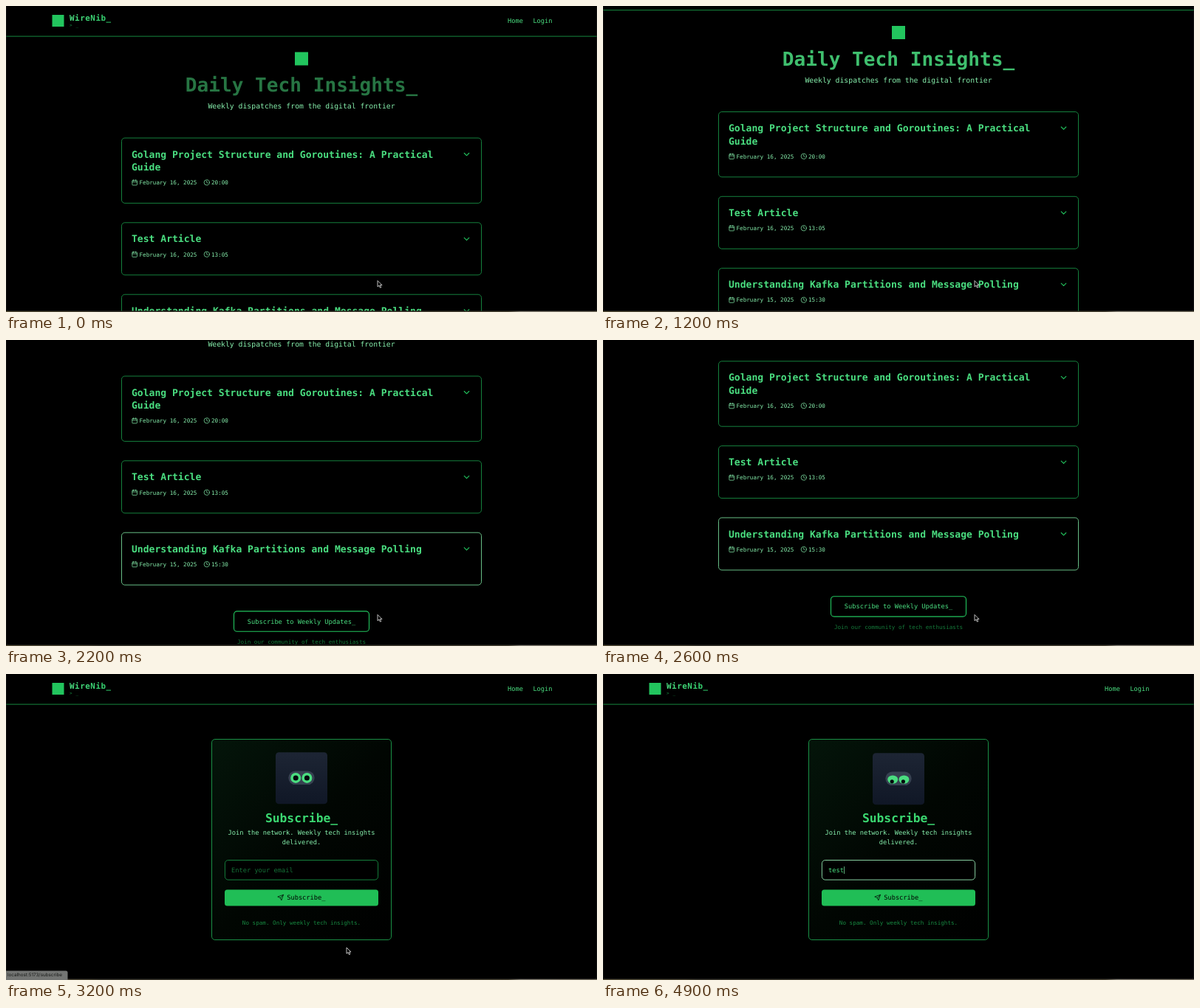
An HTML page for the animation above (5 s loop, 800x415 px).

```html
<!DOCTYPE html>
<html lang="en">
<head>
<meta charset="utf-8">
<title>Tech dispatches</title>
<style>
html, body { margin: 0; width: 100%; height: 100%; overflow: hidden; background: #000; }
svg { display: block; width: 100vw; height: 100vh; }
text { font-family: "DejaVu Sans Mono", monospace; text-rendering: geometricPrecision; white-space: pre; }
.b { font-weight: 700; }
.mid { text-anchor: middle; }
.ui { font-family: Inter, Roboto, sans-serif; }
.line { fill: none; stroke-linecap: round; stroke-linejoin: round; }
</style>
</head>
<body>
<svg id="stage" viewBox="0 0 800 415" xmlns="http://www.w3.org/2000/svg"></svg>
<script>
const LOOP = 5000, STEP = 100, SWITCH = 3100;
const G3 = '#86efac', G4 = '#4ade80', G5 = '#22c55e', G7 = '#15803d';
const K = 800 / 1470; // page px to stage px

const text = (x, y, px, str, fill, more = '') =>
  `<text x="${x}" y="${y}" font-size="${px * K}" fill="${fill}" ${more}>${str}</text>`;
const mid = (y, px, str, fill, more = '') =>
  text(400, y, px, str, fill, `class="mid" ${more}`);
const box = (x, y, w, h, stroke, more = '') =>
  `<rect x="${x}" y="${y}" width="${w}" height="${h}" rx="4.4" stroke="${stroke}" ${more}/>`;
const icon = (x, y, px, stroke, body) =>
  `<g class="line" stroke="${stroke}" stroke-width="2" transform="translate(${x} ${y}) scale(${px * K / 24})">${body}</g>`;

const CALENDAR = '<path d="M8 2v4M16 2v4M3 10h18"/><rect x="3" y="4" width="18" height="18" rx="2"/>';
const CLOCK = '<circle cx="12" cy="12" r="10"/><path d="M12 6v6l4 2"/>';
const CHEVRON = '<path d="M6 9l6 6 6-6"/>';
const SEND = '<path d="M22 2L15 22 11 13 2 9zM22 2L11 13"/>';

const nav = () => `
  <rect width="800" height="41" fill="#000"/>
  <rect y="40.6" width="800" height="1" fill="#16883f"/>
  <rect x="62.5" y="12" width="16" height="16" fill="${G5}"/>
  ${text(86, 20, 20, 'WireNib_', 'url(#brand)', 'class="b" letter-spacing=".54"')}
  ${text(86, 28, 11, '&gt; _', G5, 'opacity=".7" letter-spacing=".6"')}
  ${text(679, 23.2, 16, 'Home', G4)}
  ${text(713.4, 23.2, 16, 'Login', G4)}`;

function card(id, y, lines, date, time) {
  const extra = (lines.length - 1) * 17.4;
  const row = y + 43 + extra;
  return box(156.5, y, 487, 71 + extra, G7, `id="${id}" fill="#000" stroke-width="1"`) +
    lines.map((s, i) => text(170, y + 26.6 + i * 17.4, 24, s, G4, 'class="b"')).join('') +
    icon(617, y + 15.6, 24, G5, CHEVRON) +
    icon(169.8, row - 4.4, 16, G3, CALENDAR) + text(180.5, row + 2.7, 14, date, G3) +
    icon(267.4, row - 4.4, 16, G3, CLOCK) + text(278, row + 2.7, 14, time, G3);
}

const home = () => `
  ${nav()}
  <rect x="391" y="62.5" width="18" height="18" fill="${G5}"/>
  ${mid(116, 48, 'Daily Tech Insights_', G4, 'id="title" font-weight="700"')}
  ${mid(139.3, 18, 'Weekly dispatches from the digital frontier', G3)}
  ${card('c1', 179, ['Golang Project Structure and Goroutines: A Practical', 'Guide'], 'February 16, 2025', '20:00')}
  ${card('c2', 293.8, ['Test Article'], 'February 16, 2025', '13:05')}
  ${card('c3', 391.2, ['Understanding Kafka Partitions and Message Polling'], 'February 15, 2025', '15:30')}
  ${box(308.5, 497.9, 183, 27.4, G5, 'id="join" fill="#000" stroke-width="1.1"')}
  ${mid(514.6, 16, 'Subscribe to Weekly Updates_', G4)}
  ${mid(542.3, 14, 'Join our community of tech enthusiasts', G5, 'opacity=".62"')}`;

const eye = x => `<g transform="translate(${x} 0)">
  <ellipse class="eye" rx="7" ry="7" fill="${G4}"/>
  <circle class="pupil" r="3.5" fill="#05080d"/></g>`;

const signup = () => `
  ${nav()}
  ${box(278.5, 88.5, 243, 272, '#1a8f45', 'fill="url(#panel)" stroke-width="1"')}
  <g id="bot">
    <rect x="365" width="70" height="70" rx="4.4" fill="url(#tile)"/>
    <rect x="382.3" y="25.2" width="35.4" height="18.6" rx="9.3" fill="#374151"/>
    <g transform="translate(0 34.6)">${eye(392.2)}${eye(407.4)}</g>
  </g>
  ${mid(200.6, 30, 'Subscribe_', '#3bd871', 'font-weight="700"')}
  ${mid(218, 16, 'Join the network. Weekly tech insights', G3)}
  ${mid(231.1, 16, 'delivered.', G3)}
  ${box(296.4, 252.5, 207.2, 26.6, G7, 'id="field" fill="#000" stroke-width="1"')}
  ${text(305, 269, 16, '', G4, 'id="entry"')}
  <rect id="caret" y="261" width=".7" height="10" fill="${G3}"/>
  <rect x="296" y="292.5" width="208" height="22" rx="3.5" fill="#20be56"/>
  ${icon(367.4, 299, 16, '#000', SEND)}
  ${text(380.2, 306.4, 16, 'Subscribe_', '#000')}
  ${mid(339.8, 14, 'No spam. Only weekly tech insights.', G5, 'opacity=".68"')}`;

const stop = (at, c) => `<stop offset="${at}" stop-color="${c}"/>`;
const $ = id => document.getElementById(id);

$('stage').innerHTML = `
  <defs>
    <linearGradient id="brand">${stop(0, G4)}${stop(1, '#2fcb69')}</linearGradient>
    <linearGradient id="panel" x2="1" y2="1">${stop(0, '#04150a')}${stop(.5, '#010602')}${stop(1, '#000')}</linearGradient>
    <linearGradient id="tile" x2="0" y2="1">${stop(0, '#1d2534')}${stop(1, '#101726')}</linearGradient>
    <linearGradient id="desk">${stop(0, '#5a5238')}${stop(.14, '#4a4431')}${stop(.16, '#39362b')}${stop(.85, '#4b4534')}${stop(.87, '#8d877a')}${stop(1, '#77705f')}</linearGradient>
  </defs>
  <rect width="800" height="415" fill="#000"/>
  <g id="home">${home()}</g>
  <g id="signup">${signup()}</g>
  <rect y="413.7" width="800" height="1.3" fill="url(#desk)"/>
  <path d="M.3 0V410Q.3 413.5 4 413.6H796Q799.7 413.5 799.7 410V0" fill="none" stroke="#222" stroke-width=".6"/>
  <g id="status">
    <path d="M0 402.4H81Q83.5 402.4 83.5 405V415H0Z" fill="#737573"/>
    ${text(2, 410.4, 11.6, 'localhost:5173/subscribe', '#161816', 'class="ui"')}
  </g>
  <path id="arrow" d="M0 0V8.2L2 6.5 3.4 9.6 4.8 9 3.4 6H6Z" fill="#000" stroke="#eee" stroke-width=".8"/>
  <path id="beam" class="line" d="M-1.5-5Q0-5 0-4V4Q0 5-1.5 5M1.5-5Q0-5 0-4M0 4Q0 5 1.5 5" stroke="#eee" stroke-width=".8"/>`;

// [time, value...] rows
const SCROLL = [[600, 0], [800, 12.5], [1200, 35.5], [1500, 61], [1800, 88.8], [2200, 130], [2500, 150.2]];
const MOUSE = [[2600, 503, 372.5], [2900, 461, 371], [3400, 461, 371], [3800, 432, 318], [4200, 398, 266]];
const LOOK = [[4200, 0], [4500, 1]];
const HOVER = [[1400, 0], [1700, 1], [2700, 1], [2900, 0]];
const KEYS = [4500, 4600, 4800, 4900];

function at(rows, t, col = 1) {
  if (t <= rows[0][0]) return rows[0][col];
  for (let i = 1; i < rows.length; i++) {
    const a = rows[i - 1], b = rows[i];
    if (t <= b[0]) return a[col] + (b[col] - a[col]) * (t - a[0]) / (b[0] - a[0]);
  }
  return rows[rows.length - 1][col];
}
const set = (el, attrs) => { for (const k in attrs) el.setAttribute(k, attrs[k]); };
const show = (id, on) => set($(id), { visibility: on ? 'visible' : 'hidden' });
const mix = (a, b, p) => `rgb(${a.map((v, i) => Math.round(v + (b[i] - v) * p))})`;
const wave = (t, period) => Math.cos(2 * Math.PI * t / period);

function draw(t) {
  const onHome = t < SWITCH;
  show('home', onHome);
  show('signup', !onHome);
  set($('home'), { transform: `translate(0 ${-at(SCROLL, t)})` });
  set($('title'), { opacity: .75 + .25 * wave(t - 850, 2000) });
  set($('c3'), { stroke: mix([21, 128, 61], [104, 190, 134], at(HOVER, t)) });

  const over = t >= 2800 && onHome;
  set($('join'), { fill: over ? '#06200f' : '#000' });
  show('status', t >= 2900 && t < 3700);

  const x = at(MOUSE, t, 1), y = at(MOUSE, t, 2);
  const beam = !onHome && y < 279;
  const typing = t >= KEYS[0];
  for (const id of ['arrow', 'beam']) set($(id), { transform: `translate(${x} ${y})` });
  show('arrow', !beam && !typing);
  show('beam', beam && !typing);

  const focus = t >= 4300;
  const count = KEYS.filter(k => t >= k).length;
  const entry = $('entry');
  entry.textContent = count ? 'test'.slice(0, count) : 'Enter your email';
  set(entry, { fill: count ? G4 : '#157238' });
  set($('field'), { stroke: focus ? '#86cfa0' : G7 });
  set($('caret'), { x: 305.3 + count * 16 * K * .602 });
  show('caret', focus && !onHome);

  const look = at(LOOK, t);
  set($('bot'), { transform: `translate(0 ${106.8 - .5 * wave(t - 3200, 3400)})` });
  document.querySelectorAll('.eye').forEach(e => set(e, { ry: 7 - 1.3 * look, cy: 1.2 * look }));
  document.querySelectorAll('.pupil').forEach(e =>
    set(e, { cx: -1 * look, cy: 3.9 * look, r: 3.5 - .9 * look }));
}

function tick() {
  const t = performance.now() % LOOP;
  draw(Math.floor(t / STEP) * STEP);
  requestAnimationFrame(tick);
}
tick();
</script>
</body>
</html>
```
